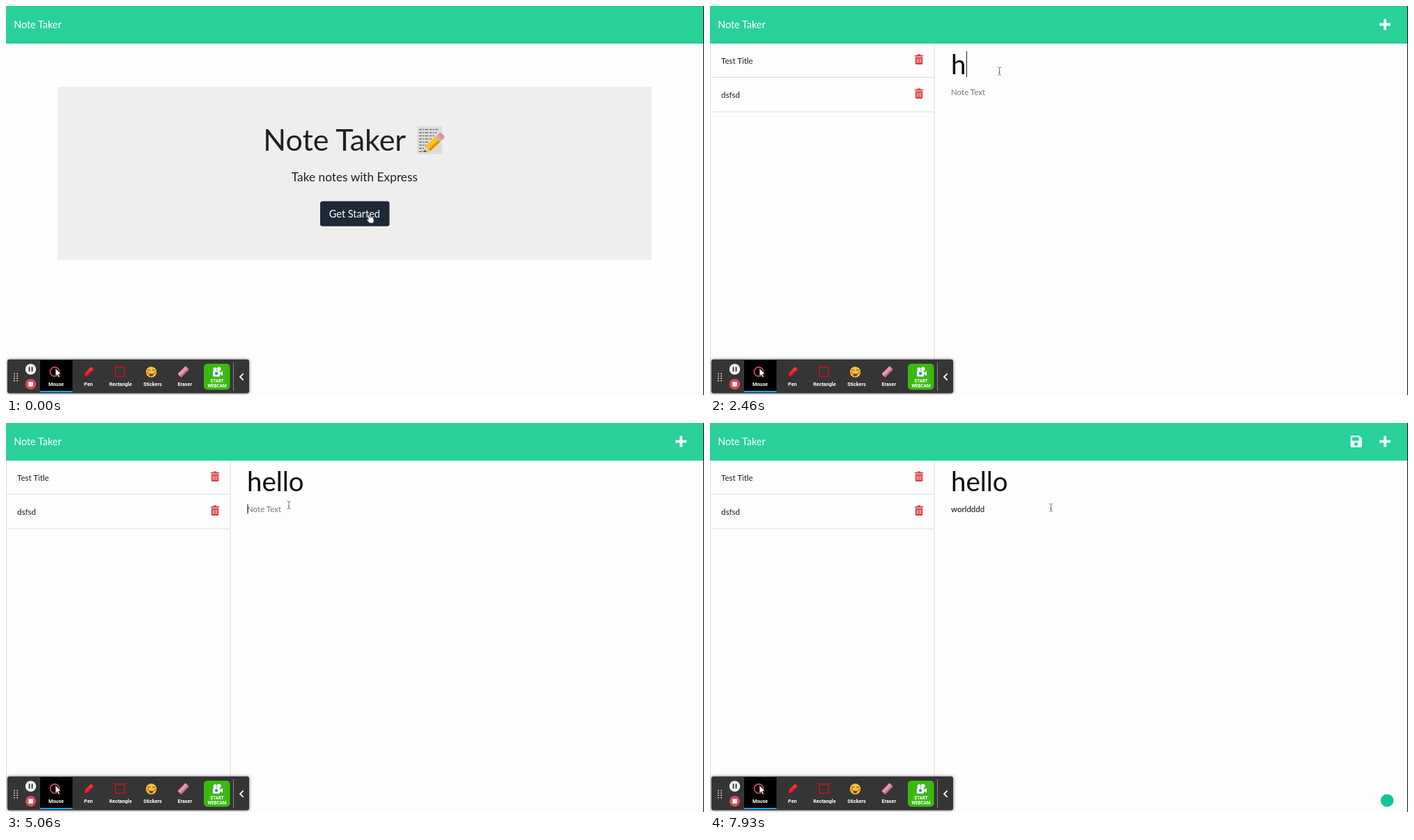
An HTML page for the animation above (8 s loop, 1002 px wide and 559 px high).

```html
<!DOCTYPE html>
<html lang="en">
<head>
<meta charset="utf-8">
<title>Note Taker</title>
<style>
  html, body { margin: 0; width: 100%; height: 100%; overflow: hidden; background: #fdfdfd; }
  svg { display: block; width: 1002px; height: 559px; }
  text { font-family: Lato, sans-serif; white-space: pre; }
  .mid { text-anchor: middle; }
  .item { font-size: 11.53px; fill: #1c1c1c; }
  .tool { font: 700 7.2px Roboto, sans-serif; fill: #fff; text-anchor: middle; }
  .rule { stroke: #dedede; fill: none; }
</style>
</head>
<body>
<svg viewBox="0 0 1002 559">
  <defs>
    <filter id="shadow" x="-5%" y="-30%" width="110%" height="160%">
      <feDropShadow dx="0" dy="0" stdDeviation="2" flood-color="#000" flood-opacity=".6"/>
    </filter>
    <g id="trash">
      <path d="M-6 -6.3h3.4l.8-1.2h3.6l.8 1.2H6v1.9H-6z" fill="#dc3a40"/>
      <path d="M-5.2 -3.5H5.2V5.5a1.5 1.5 0 0 1-1.5 1.5H-3.7a1.5 1.5 0 0 1-1.5-1.5z" fill="#dc3a40"/>
      <path d="M-2.6 -1.5v6.4M0 -1.5v6.4M2.6 -1.5v6.4" stroke="#fbe6e6" stroke-width="1"/>
    </g>
  </defs>

  <rect width="1002" height="559" fill="#fdfdfd"/>
  <rect width="1001" height="54" fill="#29d09a"/>
  <text x="11.2" y="32" font-size="14.4" fill="#fff">Note Taker</text>

  <g id="home">
    <rect x="74" y="116" width="853" height="249" rx="3" fill="#eee"/>
    <text x="369.3" y="207.5" font-size="43" fill="#212121">Note Taker</text>
    <g id="memo">
      <rect x="590" y="173" width="36" height="40" fill="#dcdcda"/>
      <path d="M593 177.5h27M593 182h25M593 186.5h23M593 191h18M593 195.5h14M593 200h10M593 204.500h8M593 209h14"
            stroke="#777" stroke-width="1.3" stroke-dasharray="4 1 2 1.2 5 1.5"/>
      <g transform="translate(600 210) rotate(-43)">
        <path d="M0 0L8 -5V5z" fill="#efcfa0"/>
        <path d="M0 0L3 -1.9V1.900z" fill="#333"/>
        <rect x="7.500" y="-5" width="20" height="10" fill="#f7c51e"/>
        <rect x="7.500" y="1.500" width="20" height="3.500" fill="#dd9412"/>
        <rect x="27" y="-5" width="4" height="10" fill="#b9bdb9"/>
        <path d="M31 -5h3q3 0 3 3v4q0 3-3 3h-3z" fill="#ea8c94"/>
      </g>
    </g>
    <text class="mid" x="500.4" y="252" font-size="17.3" fill="#212121">Take notes with Express</text>
    <rect x="451" y="280.500" width="99.500" height="36" rx="3.500" fill="#1d2a36"/>
    <text class="mid" x="500.4" y="304" font-size="14.5" fill="#fff">Get Started</text>
  </g>

  <g id="notes">
    <path class="rule" d="M.5 54V559M322 54V559M1 102.500H322M2 152H322"/>
    <text class="item" x="16" y="82.500">Test Title</text>
    <text class="item" x="16" y="131.500">dsfsd</text>
    <use href="#trash" x="300" y="77"/>
    <use href="#trash" x="300" y="126"/>
    <path d="M969 18.500V34.500M961 26.500H977" stroke="#e9fbf4" stroke-width="4"/>
    <path id="save" fill="#e6faf2" fill-rule="evenodd"
      d="M921.500 18h10.500l4 4v11a2 2 0 0 1-2 2h-12.500a2 2 0 0 1-2-2V20a2 2 0 0 1 2-2z
         M922 20.500v5h9.500v-5z M925 30.200a2.500 2.500 0 1 0 5 0a2.500 2.500 0 1 0-5 0z"/>
    <text id="title" x="346" y="98.300" font-size="38.4"></text>
    <text id="body" x="346" y="127.500" font-size="11.53"></text>
    <rect id="caret" width="1" fill="#111"/>
    <circle id="badge" cx="972" cy="542.500" r="9.300" fill="#15c39a"/>
  </g>

  <g id="toolbar">
    <rect x="2" y="508" width="347" height="48.500" rx="3" fill="#363636" filter="url(#shadow)"/>
    <path d="M12 527.500v12M16.200 527.500v12" stroke="#ddd" stroke-width="1.700" stroke-dasharray="1.700 1.700"/>
    <circle cx="35.500" cy="522" r="7.700" fill="#f4f4f4"/>
    <path d="M33.500 518.500v7M37.500 518.500v7" stroke="#222" stroke-width="1.700"/>
    <circle cx="35.500" cy="543.500" r="7.700" fill="#d94a5c"/>
    <rect x="32.300" y="540.300" width="6.400" height="6.400" rx="1" fill="#fff"/>
    <rect x="49" y="509" width="46.500" height="46.500" fill="#000"/>
    <rect x="49" y="553" width="46.500" height="2.200" fill="#20a4ea"/>
    <circle cx="70" cy="525.500" r="6.600" fill="none" stroke="#df4557" stroke-width="1.700"/>
    <path d="M71 520.500v11.500l2.600-2.200 1.800 4 1.900-.9-1.800-3.900 3.300-.3z" fill="#fff" stroke="#000" stroke-width=".6"/>
    <g transform="translate(112.500 532) rotate(-46)">
      <path d="M0 0L4 -2.700H17V2.700H4z" fill="#e31b23"/>
      <path d="M4.500 -.8H16M13.500 -2.700v5.400" stroke="#ff777b" stroke-width=".8"/>
    </g>
    <rect x="157" y="519" width="13" height="13" fill="none" stroke="#cb1118" stroke-width="1.500"/>
    <circle cx="208.500" cy="526" r="7.700" fill="#f7c53a"/>
    <path d="M203.500 524q1.700-2.500 3.400 0M210.300 524q1.700-2.500 3.400 0" fill="none" stroke="#633b16" stroke-width="1.200"/>
    <path d="M204.800 528.500h7.400q-.8 3.700-3.700 3.700t-3.700-3.700z" fill="#70401f"/>
    <circle cx="203.300" cy="527" r="1.700" fill="#ef7548"/><circle cx="213.700" cy="527" r="1.700" fill="#ef7548"/>
    <g transform="translate(254.500 525.500) rotate(-45)">
      <rect x="-8" y="-3.500" width="16" height="7" rx="1" fill="#e498ad"/>
      <rect x="-8" y="1.200" width="16" height="2.300" fill="#bd6c83"/>
    </g>
    <rect x="284" y="514" width="37.500" height="37.500" rx="5" fill="#3bb90f"/>
    <rect x="297" y="524" width="10" height="8.500" rx="1" fill="#fff"/>
    <path d="M307 527l4-2.500v7l-4-2.500z" fill="#fff"/>
    <circle cx="300" cy="521.800" r="2.500" fill="#fff"/><circle cx="305.800" cy="521.500" r="2.900" fill="#fff"/>
    <circle cx="302" cy="528" r="2.200" fill="#2c86cf"/>
    <path d="M326.500 512V553" stroke="#858585"/>
    <path d="M340.700 528.300L336 533l4.700 4.700" fill="none" stroke="#fff" stroke-width="1.800"/>
    <text class="tool" x="72" y="545.500">Mouse</text>
    <text class="tool" x="118.300" y="545.500">Pen</text>
    <text class="tool" x="164.400" y="545.500">Rectangle</text>
    <text class="tool" x="210.500" y="545.500">Stickers</text>
    <text class="tool" x="256.700" y="545.500">Eraser</text>
    <text class="tool" x="303" y="541.300" style="font-size:6.300px">START</text>
    <text class="tool" x="303" y="547.700" style="font-size:6.300px">WEBCAM</text>
  </g>

  <g id="pointer">
    <path id="hand" fill="#fff" stroke="#444" stroke-width=".9" stroke-linejoin="round"
      d="M-3.200 -5.500q1.200-1.200 2 .2l1.300 3.400q1.200-.9 1.900.1 1.300-.8 1.900.3 1.400-.4 1.700.9l.5 3.600-1 3.500h-5.300l-3.500-4.300q-.5-1.500 1-1.200l1.100.8z"/>
    <path id="ibeam" fill="none" stroke="#666" stroke-width=".9"
      d="M-2.500 -5.500q2.500 0 2.500 1.500 0-1.500 2.500-1.500M0 -4V4M-2.500 5.500q2.500 0 2.500-1.500 0 1.500 2.500 1.500M-1.300 1.700h2.600"/>
  </g>
  <path d="M1001.500 0V559" stroke="#141414"/>
</svg>

<script>
const LOOP = 8000;
const OPEN_NOTES = 260, FOCUS_TITLE = 2130, FOCUS_BODY = 5000, CAN_SAVE = 5380;
const el = id => document.getElementById(id);
const show = (id, on) => el(id).setAttribute('visibility', on ? 'inherit' : 'hidden');

// [time, text after the key press]
const titleKeys = [[2460, 'h'], [2660, 'he'], [2860, 'hel'], [3010, 'hell'], [3200, 'hello'],
                   [3460, 'hellow'], [3930, 'hello']];
const bodyKeys = [[5300, 'w'], [5480, 'wo'], [5660, 'wor'], [5830, 'worl'], [6000, 'world'],
                  [6800, 'worldd'], [6960, 'worlddd'], [7130, 'worldddd']];

// [start, end, x, y]: each move begins where the previous one ended
const moves = [[0, 0, 522, 305.5], [1130, 1860, 415.500, 93.500],
               [4200, 4900, 406, 118], [7250, 7860, 489.500, 121.500]];

const lastKey = (keys, t) => keys.filter(k => k[0] <= t).pop() || [0, ''];

function pointerAt(t) {
  let [, , x, y] = moves[0];
  for (const [start, end, toX, toY] of moves.slice(1)) {
    const p = Math.min(1, Math.max(0, (t - start) / (end - start)));
    const ease = p * p * (3 - 2 * p);
    x += (toX - x) * ease;
    y += (toY - y) * ease;
  }
  return [x, y];
}

function setField(id, value, placeholder) {
  el(id).textContent = value || placeholder;
  el(id).setAttribute('fill', value ? '#0b0b0b' : '#737373');
}

function drawCaret(t, titleKey, bodyKey) {
  const inBody = t >= FOCUS_BODY;
  const [pressed, value] = inBody ? bodyKey : titleKey;
  const since = t - Math.max(pressed, inBody ? FOCUS_BODY : FOCUS_TITLE);
  const visible = t >= FOCUS_TITLE && since % 1000 < 500;
  show('caret', visible && t >= OPEN_NOTES);
  const width = value ? el(inBody ? 'body' : 'title').getComputedTextLength() : 0;
  el('caret').setAttribute('x', 346.5 + width);
  el('caret').setAttribute('y', inBody ? 116.500 : 65);
  el('caret').setAttribute('height', inBody ? 14 : 37.500);
}

function draw(t) {
  const titleKey = lastKey(titleKeys, t), bodyKey = lastKey(bodyKeys, t);
  show('home', t < OPEN_NOTES);
  show('notes', t >= OPEN_NOTES);
  setField('title', titleKey[1], 'Note Title');
  setField('body', bodyKey[1], 'Note Text');
  drawCaret(t, titleKey, bodyKey);
  for (const id of ['save', 'badge']) show(id, t >= CAN_SAVE);

  const moved = t > moves[1][0];
  show('pointer', t < 2560 || t >= 4200);
  show('hand', !moved);
  show('ibeam', moved);
  el('pointer').setAttribute('transform', `translate(${pointerAt(t)})`);
}

const begin = performance.now();
function tick() {
  draw((performance.now() - begin) % LOOP);
  requestAnimationFrame(tick);
}
tick();
</script>
</body>
</html>
```
